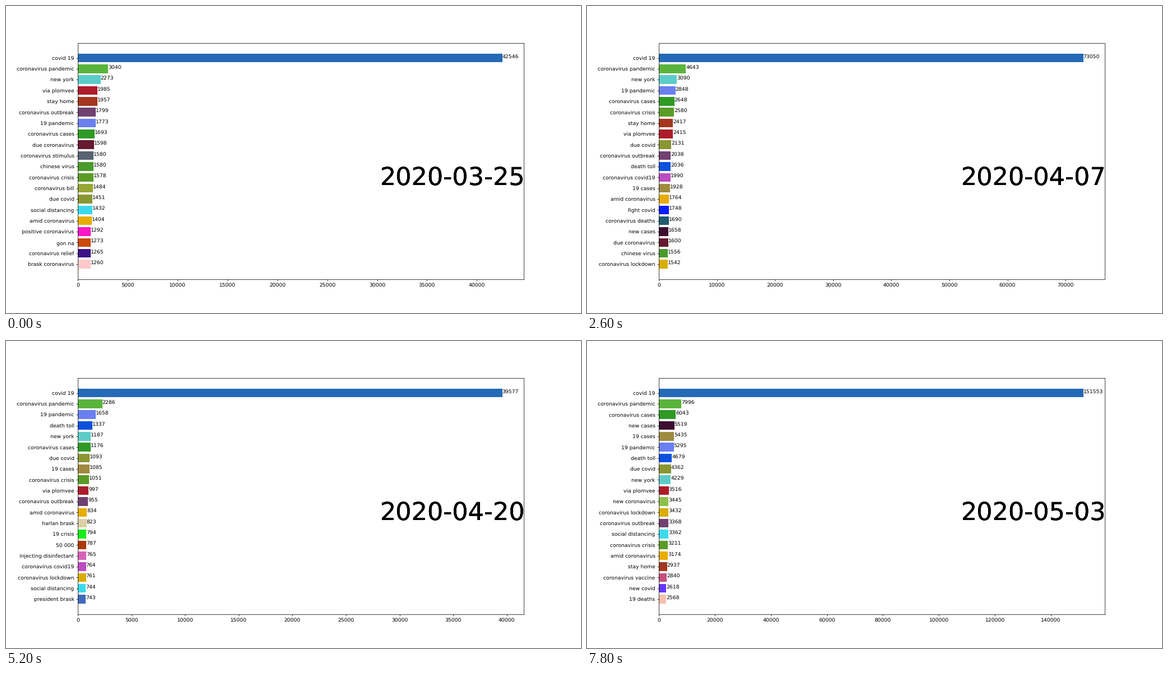
These frames come from a looping animation (1025 px wide and 547 px high, 8000 ms). A matplotlib script:

```python
import numpy as np
import matplotlib.pyplot as plt
from matplotlib.animation import FuncAnimation

W, H, DPI = 1025, 547, 100
SCALE = 2 / 3          # all default type and line sizes shrink by this factor
DAYS, STEP_MS = 40, 200
ROWS = 20
START = np.datetime64("2020-03-25")

COLORS = {
    "covid 19": "#246ab6", "coronavirus pandemic": "#5ab43c",
    "new york": "#5cccc8", "via plomvee": "#ad1c2a",
    "stay home": "#a5361f", "coronavirus outbreak": "#6f4070",
    "19 pandemic": "#6a7ff0", "coronavirus cases": "#2f9a25",
    "due coronavirus": "#661a30", "coronavirus stimulus": "#586373",
    "chinese virus": "#4a9a2c", "coronavirus crisis": "#5a9c26",
    "coronavirus bill": "#96a735", "due covid": "#899632",
    "social distancing": "#3adaec", "amid coronavirus": "#e8ac02",
    "positive coronavirus": "#fb16c8", "gon na": "#cb4a0a",
    "coronavirus relief": "#3e1288", "brask coronavirus": "#ffc9c9",
    "coronavirus covid19": "#bc4cc0", "fight coronavirus": "#22d4d6",
    "coronavirus lockdown": "#d9ad00", "must act": "#984c34",
    "deliver copy": "#f85cf4", "copy officials": "#9b5065",
    "signing must": "#a2ecb8", "19 cases": "#9f8a3e",
    "fight covid": "#0a1cfa", "19 crisis": "#16ee18",
    "new cases": "#3c0e30", "coronavirus response": "#50a4ea",
    "death toll": "#0c50de", "coronavirus deaths": "#205a6e",
    "orvil mundek": "#d8a4e8", "coronavirus death": "#ecf060",
    "harlan brask": "#ddd0a4", "50 000": "#ab3a04",
    "injecting disinfectant": "#d862b8", "president brask": "#426abc",
    "coronavirus cure": "#857806", "cashless society": "#ce9298",
    "vkj news": "#6b4810", "new coronavirus": "#8cc04a",
    "coronavirus vaccine": "#c4507e", "new covid": "#6038fc",
    "19 deaths": "#f6bfae",
}

# Known counts, by days since START.
COUNTS = {
    0: {
        "covid 19": 42546, "coronavirus pandemic": 3040, "new york": 2273,
        "via plomvee": 1985, "stay home": 1957, "coronavirus outbreak": 1799,
        "19 pandemic": 1773, "coronavirus cases": 1693,
        "due coronavirus": 1598, "coronavirus stimulus": 1580,
        "chinese virus": 1580, "coronavirus crisis": 1578,
        "coronavirus bill": 1484, "due covid": 1451,
        "social distancing": 1432, "amid coronavirus": 1404,
        "positive coronavirus": 1292, "gon na": 1273,
        "coronavirus relief": 1265, "brask coronavirus": 1260,
    },
    5: {
        "covid 19": 159404, "coronavirus pandemic": 10132, "new york": 6932,
        "coronavirus outbreak": 6455, "stay home": 6453,
        "coronavirus cases": 6382, "19 pandemic": 6204, "via plomvee": 5958,
        "coronavirus crisis": 5554, "social distancing": 5396,
        "amid coronavirus": 4951, "due covid": 4635,
        "coronavirus covid19": 4549, "due coronavirus": 4519,
        "fight coronavirus": 4321, "coronavirus lockdown": 4051,
        "must act": 4047, "deliver copy": 4033, "copy officials": 4025,
        "signing must": 4000,
    },
    9: {
        "covid 19": 171800, "coronavirus pandemic": 10837, "new york": 7045,
        "19 pandemic": 6976, "coronavirus crisis": 6868,
        "coronavirus cases": 6228, "stay home": 6052, "via plomvee": 5925,
        "coronavirus outbreak": 5378, "due covid": 5029,
        "coronavirus covid19": 4636, "amid coronavirus": 4416,
        "19 cases": 4321, "due coronavirus": 4272, "fight covid": 3994,
        "social distancing": 3940, "19 crisis": 3902, "new cases": 3774,
        "fight coronavirus": 3749, "coronavirus response": 3584,
    },
    17: {
        "covid 19": 31061, "coronavirus pandemic": 1989, "death toll": 1361,
        "new york": 1355, "19 pandemic": 1163, "coronavirus cases": 1126,
        "via plomvee": 984, "coronavirus crisis": 969, "stay home": 965,
        "coronavirus deaths": 937, "due covid": 903, "19 cases": 860,
        "coronavirus covid19": 854, "chinese virus": 795,
        "coronavirus lockdown": 781, "coronavirus outbreak": 772,
        "fight covid": 765, "orvil mundek": 736, "new cases": 728,
        "amid coronavirus": 705,
    },
    23: {
        "covid 19": 23842, "coronavirus pandemic": 1472, "19 pandemic": 1069,
        "death toll": 955, "coronavirus cases": 736,
        "coronavirus crisis": 734, "due covid": 672, "new york": 657,
        "coronavirus outbreak": 655, "19 cases": 643, "19 crisis": 565,
        "coronavirus covid19": 529, "coronavirus lockdown": 525,
        "via plomvee": 519, "amid coronavirus": 517,
        "social distancing": 504, "due coronavirus": 482,
        "fight covid": 464, "stay home": 461, "coronavirus death": 458,
    },
    30: {
        "covid 19": 77786, "coronavirus pandemic": 4112, "19 pandemic": 2978,
        "new york": 2612, "via plomvee": 2383, "harlan brask": 2231,
        "coronavirus cases": 2195, "19 cases": 2180, "death toll": 2094,
        "due covid": 2092, "50 000": 2011, "injecting disinfectant": 1884,
        "president brask": 1758, "new cases": 1734,
        "coronavirus cure": 1700, "coronavirus crisis": 1698,
        "amid coronavirus": 1579, "coronavirus outbreak": 1577,
        "cashless society": 1481, "vkj news": 1469,
    },
    39: {
        "covid 19": 151553, "coronavirus pandemic": 7996,
        "coronavirus cases": 6043, "new cases": 5519, "19 cases": 5435,
        "19 pandemic": 5295, "death toll": 4679, "due covid": 4362,
        "new york": 4229, "via plomvee": 3516, "new coronavirus": 3445,
        "coronavirus lockdown": 3432, "coronavirus outbreak": 3368,
        "social distancing": 3362, "coronavirus crisis": 3211,
        "amid coronavirus": 3174, "stay home": 2937,
        "coronavirus vaccine": 2840, "new covid": 2618, "19 deaths": 2568,
    },
}


def ranking(day):
    """Top terms of a day, smallest first, blended between known days."""
    if day in COUNTS:
        ranked = list(COUNTS[day].items())
    else:
        before = max(d for d in COUNTS if d < day)
        after = min(d for d in COUNTS if d > day)
        a, b = COUNTS[before], COUNTS[after]
        t = (day - before) / (after - before)
        # A term missing from one list is taken to sit just below its end.
        low_a, low_b = 0.85 * min(a.values()), 0.85 * min(b.values())
        blend = {
            term: round(a.get(term, low_a) ** (1 - t) * b.get(term, low_b) ** t)
            for term in {**a, **b}
        }
        ranked = sorted(blend.items(), key=lambda item: -item[1])
    return ranked[:ROWS][::-1]


plt.rcParams.update({
    "font.family": "DejaVu Sans",
    "font.size": 10 * SCALE,
    "text.hinting": "none",
    "axes.linewidth": 0.8 * SCALE,
    **{f"{axis}tick.major.{key}": value * SCALE
       for axis in "xy"
       for key, value in (("size", 3.5), ("pad", 3.5), ("width", 0.8))},
})

fig, ax = plt.subplots(figsize=(W / DPI, H / DPI), dpi=DPI)
fig.subplots_adjust(left=0.125, right=0.9, bottom=0.11, top=0.88)


def draw(day):
    ax.clear()
    terms, values = zip(*ranking(day))
    ax.barh(range(ROWS), values, tick_label=terms,
            color=[COLORS[term] for term in terms])
    for row, value in enumerate(values):
        ax.text(value, row, str(value))
    # Overprinting gives the date its heavier edges.
    for _ in range(4):
        ax.text(0.65, 0.416, str(START + day), size=48 * SCALE,
                transform=fig.transFigure)


anim = FuncAnimation(fig, draw, frames=DAYS, interval=STEP_MS,
                     repeat=True, repeat_delay=0)
plt.show()
```
